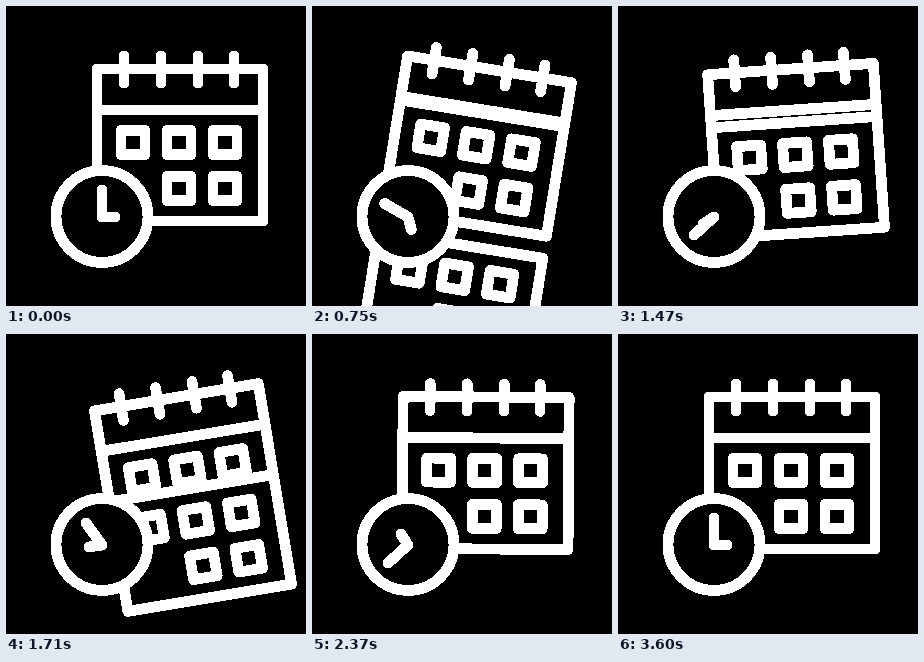
Write an HTML page that moves like this. It is 300x300 px and loops after 3.63 s.

```html
<!DOCTYPE html>
<html lang="en">
<head>
<meta charset="utf-8">
<title>Calendar and clock</title>
<style>
  html, body { margin: 0; height: 100%; overflow: hidden; background: #000; }
  svg { display: block; width: 300px; height: 300px; shape-rendering: crispEdges; }
</style>
</head>
<body>
<svg viewBox="0 0 300 300" fill="none" stroke="#fff" stroke-width="10.8" stroke-linecap="round" stroke-linejoin="round">
  <defs>
    <path id="box" d="M-12-12h24v24h-24z"/>
    <g id="sheet">
      <path fill="#000" d="M91 104h166v111h-166z"/>
      <use href="#box" x="127" y="136.5"/>
      <use href="#box" x="173" y="136.5"/>
      <use href="#box" x="219" y="136.5"/>
      <use href="#box" x="173" y="182.5"/>
      <use href="#box" x="219" y="182.5"/>
    </g>
  </defs>
  <g id="calendar">
    <use href="#sheet"/>
    <use class="falling" href="#sheet"/>
    <use class="falling" href="#sheet"/>
    <use class="falling" href="#sheet"/>
    <path d="M91 104V63h166v41zM118 50v27M155 50v27M192 50v27M228 50v27"/>
  </g>
  <circle cx="96" cy="210.5" r="46" fill="#000"/>
  <path id="minute" d="M96 211v-27"/>
  <path id="hour" d="M96 211v-13"/>
</svg>
<script>
  const LOOP = 3630, STEP = 30, SWING = 900, FALL_GAP = 600, FALL_END = 870;
  const angles = [0, 10, -10, 5, 0, 0];
  const $ = id => document.getElementById(id);
  // Later sheets lie beneath earlier ones.
  const sheets = [...document.querySelectorAll('.falling')].reverse();

  const rotate = (id, angle, x, y) =>
    $(id).setAttribute('transform', `rotate(${angle} ${x} ${y})`);

  function swing(t) {
    const i = Math.floor(t / SWING), p = t / SWING - i;
    return angles[i] + (angles[i + 1] - angles[i]) * p * p * (3 - 2 * p);
  }

  function fall(age) {
    const p = age / 900;
    return 127 * p ** 2 + 101 * p ** 4;
  }

  function draw(t) {
    rotate('calendar', swing(t), 174, 85);
    sheets.forEach((sheet, i) => {
      const age = t - i * FALL_GAP;
      const visible = age > 0 && age < FALL_END;
      sheet.setAttribute('visibility', visible ? 'visible' : 'hidden');
      if (visible) sheet.setAttribute('y', fall(age));
    });
    rotate('minute', t * 0.4, 96, 211);
    rotate('hour', 90 + t * 0.1, 96, 211);
  }

  const start = performance.now();
  function tick() {
    const t = (performance.now() - start) % LOOP;
    draw(Math.floor(t / STEP) * STEP);
    requestAnimationFrame(tick);
  }
  tick();
</script>
</body>
</html>
```
